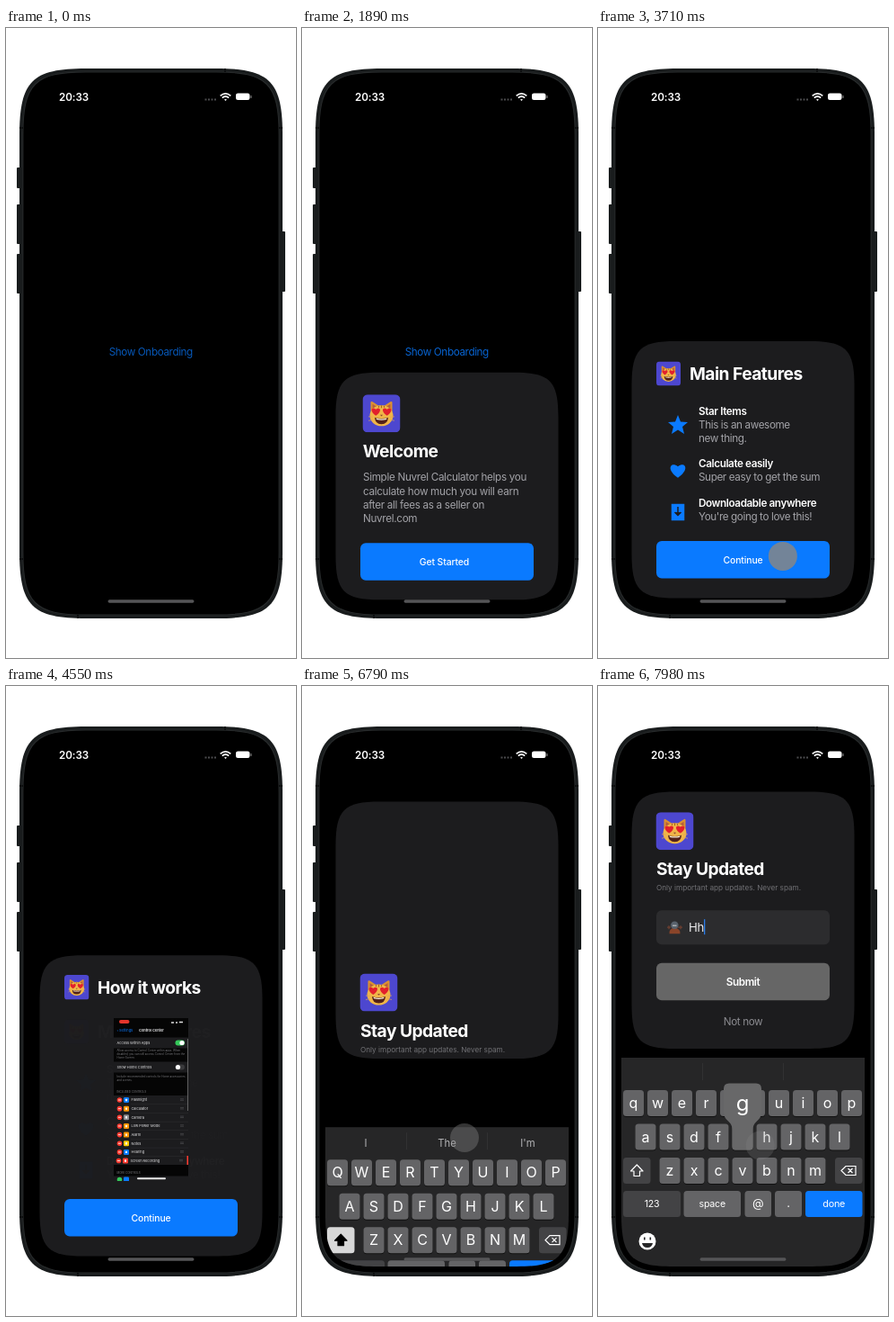
Animation of 323x700 px, one loop 8 s. Source, as an HTML page:

```html
<!DOCTYPE html>
<html lang="en">
<head>
<meta charset="utf-8">
<title>Onboarding sheet</title>
<style>
html, body { margin: 0; width: 100%; height: 100%; overflow: hidden; background: #fff; }
svg { display: block; width: 100%; height: 100%; font-family: Inter, Roboto, sans-serif; }
.mid { text-anchor: middle; }
.body { font-size: 11.7px; letter-spacing: -.033em; }
.title { font-size: 19.2px; font-weight: 700; letter-spacing: -.028em; fill: #fff; }
.label { font-size: 10.4px; font-weight: 500; letter-spacing: -.01em; fill: #fff; text-anchor: middle; }
.tiny { font-size: 3.9px; fill: #e4e4e6; }
.note { font-size: 3px; fill: #77777b; }
</style>
</head>
<body>
<svg viewBox="0 0 323 700">
  <defs>
    <clipPath id="screenClip"><path id="screenEdge"/></clipPath>
    <clipPath id="sheetClip"><path id="sheetEdge"/></clipPath>
    <clipPath id="videoClip"><rect x="120" y="369" width="83" height="181"/></clipPath>
    <path id="heart" d="M0 5C-9 -1 -5 -7 0 -3C5 -7 9 -1 0 5Z"/>
    <symbol id="icon" viewBox="0 0 42 42">
      <rect width="42" height="42" rx="5.5" fill="#4d47cf"/>
      <path d="M9 20L9 8.500Q9.500 7 11 8L18 12.500H24L31 8Q32.500 7 33 8.500L33 20Z" fill="#dc9130"/>
      <path d="M11 15.500V10.500L15.500 13.500ZM31 15.500V10.500L26.500 13.500Z" fill="#b45f3c"/>
      <ellipse cx="21" cy="23.500" rx="13" ry="11.500" fill="#f0b548"/>
      <path d="M21 12V15M18 12.800V14.500M24 12.800V14.500" stroke="#a5641f" stroke-width="1.200"/>
      <path d="M13.500 25.500Q21 28 28.500 25.500Q28 33 21 33Q14 33 13.500 25.500Z" fill="#532219"/>
      <path d="M15 26.300Q21 28 27 26.300L26.500 27.800Q21 29 15.500 27.800Z" fill="#fff3dc"/>
      <use href="#heart" transform="translate(14.800 19) scale(.88)" fill="#e2202c"/>
      <use href="#heart" transform="translate(27.200 19) scale(.88)" fill="#e2202c"/>
      <path d="M19.500 22.500H22.500L21 24.300Z" fill="#87452d"/>
      <path d="M6.500 24.500L11 25M6.500 29L11 28M35.500 24.500L31 25M35.500 29L31 28" stroke="#d8a45b" stroke-width=".7"/>
    </symbol>
  </defs>

  <g fill="#191c1d">
    <rect x="12" y="155" width="6" height="23" rx="1"/>
    <rect x="12" y="196" width="6" height="44" rx="1"/>
    <rect x="12" y="251" width="6" height="44" rx="1"/>
    <rect x="305" y="226" width="6" height="67" rx="1"/>
    <path id="body"/>
  </g>
  <path id="bezel" stroke="#272a2b" stroke-width="1.200"/>
  <path d="M15 111H19M15 590H19M304 111H308M304 590H308M244 45V49M80 652V656" stroke="#0c0e0f" stroke-width="2"/>

  <g clip-path="url(#screenClip)">
    <text x="59" y="81" font-size="11.700" font-weight="600" letter-spacing="-.1" fill="#fff">20:33</text>
    <path d="M221.500 79.500H234" stroke="#4c4c4e" stroke-width="2" stroke-dasharray="2 1.500"/>
    <g fill="none" stroke="#fff" stroke-width="1.700">
      <path d="M238.700 75.300Q244.500 70.300 250.300 75.300M240.800 77.600Q244.500 74.400 248.200 77.600"/>
      <path d="M243 79.500L244.500 81L246 79.500Q244.500 78.300 243 79.500Z" fill="#fff" stroke="none"/>
    </g>
    <rect x="256" y="72.500" width="15.500" height="7.500" rx="2.300" fill="#fff"/>
    <path d="M273 75V78" stroke="#777" stroke-width="1.200"/>
    <text id="link" class="body mid" x="161.300" y="363.500" fill="#0a7aff">Show Onboarding</text>

    <g id="sheet" clip-path="url(#sheetClip)">
      <rect x="37" y="50" width="249" height="600" fill="#1c1c1e"/>
      <g id="welcome">
        <use href="#icon" x="67.500" y="405" width="42" height="42"/>
        <text class="title" x="67.700" y="475.200">Welcome</text>
        <g id="intro" class="body" style="letter-spacing:-.027em" fill="#a3a3a8"></g>
      </g>
      <g id="features">
        <use href="#icon" x="65" y="370.500" width="27" height="27"/>
        <text class="title" x="102" y="391">Main Features</text>
        <g fill="#0a7aff">
          <path d="M89 430L92 437.500L100 438L94 443L96 451L89 446.500L82 451L84 443L78 438L86 437.500Z"/>
          <use href="#heart" transform="translate(89 492) scale(1.550)"/>
          <path d="M81 528H97V548H81ZM89 532V541M85.500 538L89 541.500L92.500 538" stroke="#1c1c1e" stroke-width="1.500"/>
        </g>
      </g>
      <g id="how">
        <use href="#icon" x="65" y="321" width="27.500" height="27.500"/>
        <text class="title" x="102" y="342">How it works</text>
        <g id="video" clip-path="url(#videoClip)"></g>
      </g>
      <g id="button">
        <rect x="65" y="570" width="193" height="41.500" rx="6" fill="#0a7aff"/>
        <text id="start" class="label" x="158.500" y="594.500">Get Started</text>
        <text id="next" class="label" x="161.500" y="594.500">Continue</text>
      </g>
      <g id="stay">
        <use href="#icon" x="64.500" y="372" width="42" height="42"/>
        <text class="title" x="65" y="442">Stay Updated</text>
        <text x="65" y="459" font-size="8.200" fill="#717175">Only important app updates. Never spam.</text>
        <rect x="65" y="481" width="193" height="38" rx="6" fill="#2c2c2e"/>
        <path d="M77 500H81M89 500H94M79 498V502M92 498V502" stroke="#6d3f30" stroke-width="1.300"/>
        <path d="M79.500 507Q79 501 85 500.500Q92 501 91.500 507Z" fill="#8a4429"/>
        <circle cx="85.300" cy="497.500" r="4.300" fill="#59626c"/>
        <path d="M83 498H87.500" stroke="#a9adb1" stroke-width="1.500"/>
        <text id="field" x="101" y="504.800" font-size="13.200" letter-spacing="-.3"></text>
        <rect id="caret" y="491" width="1.300" height="17" fill="#2b7de9"/>
        <rect x="65" y="539.500" width="193" height="41.500" rx="6" fill="#666"/>
        <text class="body mid" x="161.500" y="564.500" font-weight="600" fill="#fff">Submit</text>
        <text class="body mid" x="161.500" y="609" fill="#8b8b90">Not now</text>
      </g>
    </g>
    <g id="board"></g>
    <rect x="113.500" y="635.200" width="96" height="3.500" rx="1.750" fill="#555557"/>
  </g>
  <circle id="touch" r="16" fill="#878787"/>
</svg>

<script>
const $ = id => document.getElementById(id);
const LOOP = 8000;

function add(parent, tag, attrs, text) {
  const el = document.createElementNS('http://www.w3.org/2000/svg', tag);
  for (const k in attrs) el.setAttribute(k, attrs[k]);
  if (text) el.textContent = text;
  parent.appendChild(el);
  return el;
}
const rect = (p, x, y, width, height, fill, rx = 0) => add(p, 'rect', { x, y, width, height, fill, rx });
const label = (p, x, y, text, attrs) => add(p, 'text', { x, y, ...attrs }, text);

// Box with continuous corners that reach e along each side
function squircle(el, x, y, w, h, e) {
  const k = e * .81, m = e - k;
  el.setAttribute('d', `M${x + e} ${y}h${w - 2 * e}c${k} 0 ${e} ${m} ${e} ${e}v${h - 2 * e}` +
    `c0 ${k} ${-m} ${e} ${-e} ${e}h${2 * e - w}c${-k} 0 ${-e} ${-m} ${-e} ${-e}v${2 * e - h}` +
    `c0 ${-k} ${m} ${-e} ${e} ${-e}z`);
}
squircle($('body'), 15, 45, 293, 611, 74);
squircle($('bezel'), 18.8, 48.800, 285.4, 603.4, 70);
squircle($('screenEdge'), 26, 57, 271, 588, 58);

['Simple Nuvrel Calculator helps you', 'calculate how much you will earn',
 'after all fees as a seller on', 'Nuvrel.com']
  .forEach((s, i) => label($('intro'), 68, 501 + i * 15.3, s));

[['Star Items', 430, 'This is an awesome', 'new thing.'],
 ['Calculate easily', 488, 'Super easy to get the sum'],
 ['Downloadable anywhere', 531.5, "You're going to love this!"]]
  .forEach(([head, y, ...lines]) => {
    label($('features'), 112, y, head, { class: 'body', 'font-weight': 600, fill: '#fff' });
    lines.forEach((s, i) => label($('features'), 112, y + 15.2 * (i + 1), s, { class: 'body', fill: '#a3a3a8' }));
  });

function buildVideo(g) {
  const tiny = (x, y, s, cls = 'tiny', extra = {}) => label(g, x, y, s, { class: cls, ...extra });
  const toggle = (y, on) => {
    rect(g, 188.5, y - 3, 10.5, 6, on ? '#34c759' : '#3a3a3c', 3);
    add(g, 'circle', { cx: on ? 196 : 191.5, cy: y, r: 2.6, fill: '#fff' });
  };
  rect(g, 120, 369, 83, 181, '#050505');
  rect(g, 126, 371, 11.5, 4, '#e5352b', 2);
  add(g, 'path', { d: 'M184 374H187M189 374H191M193 373.500H197', stroke: '#ddd', 'stroke-width': 1.6 });
  tiny(123.5, 384, '‹ Settings', 'tiny', { style: 'fill:#0a7aff' });
  tiny(148, 384, 'Control Center', 'tiny', { 'font-weight': 700 });
  for (const [y, s, on] of [[396.5, 'Access Within Apps', true], [423.5, 'Show Home Controls', false]]) {
    rect(g, 120, y - 6, 83, 12, '#1c1c1e');
    tiny(123.5, y + 1.4, s);
    toggle(y, on);
  }
  ['Allow access to Control Center within apps. When', 'disabled, you can still access Control Center from the', 'Home Screen.']
    .forEach((s, i) => tiny(123.5, 406 + i * 4, s, 'note'));
  ['Include recommended controls for Home accessories', 'and scenes.']
    .forEach((s, i) => tiny(123.5, 434.5 + i * 4, s, 'note'));
  tiny(123.5, 452, 'INCLUDED CONTROLS', 'note');
  rect(g, 120, 455, 83, 77, '#1c1c1e');
  const colors = ['#0a7aff', '#ff9500', '#8e8e93', '#ff9500', '#ff9500', '#ffcc00', '#0a7aff', '#ff3b30'];
  ['Flashlight', 'Calculator', 'Camera', 'Low Power Mode', 'Alarm', 'Notes', 'Hearing', 'Screen Recording']
    .forEach((s, i) => {
      const y = 460 + i * 9.65, x = i === 7 ? -1 : 0;
      add(g, 'circle', { cx: 126.5 + x, cy: y, r: 2.8, fill: '#ff3b30' });
      add(g, 'path', { d: `M${125 + x} ${y}h3`, stroke: '#fff', 'stroke-width': .8 });
      rect(g, 131 + x, y - 3, 6, 6, colors[i], 1.2);
      rect(g, 133 + x, y - 1.2, 2, 2.4, '#fff', .5);
      tiny(139.5 + x, y + 1.4, s);
      add(g, 'path', { d: `M${194 + x} ${y - 1.2}h4m-4 1.500h4`, stroke: '#4c4c4f', 'stroke-width': .7 });
      if (i < 7) rect(g, 139, y + 4.6, 64, .4, '#333336');
    });
  rect(g, 201.5, 522, 2, 10, '#ff3b30');
  rect(g, 202, 392, .8, 80, '#777');
  tiny(123.5, 542, 'MORE CONTROLS', 'note');
  rect(g, 120, 544.5, 83, 8, '#1c1c1e');
  add(g, 'circle', { cx: 126.5, cy: 548.5, r: 2.8, fill: '#34c759' });
  rect(g, 131, 545.5, 6, 6, '#0a7aff', 1.2);
  rect(g, 146, 546.3, 32, 2, '#e8e8e8', 1);
}
buildVideo($('video'));

// Keyboard, laid out with its top edge at y = 0
const board = $('board'), keys = {}, words = [];
let shiftBox, shiftArrow, popup, popText;

function buildBoard() {
  const mid = { class: 'mid', fill: '#fff' };
  rect(board, 26, 0, 271, 240, '#262627');
  rect(board, 116, 6, .6, 19, '#39393b');
  rect(board, 206, 6, .6, 19, '#39393b');
  [['I', 71], ['The', 161.5], ["I'm", 251.5]].forEach(([s, x]) =>
    words.push(label(board, x, 21.5, s, { class: 'mid', fill: '#b4b4b6', 'font-size': 11.3 })));
  [['qwertyuiop', 39.5], ['asdfghjkl', 53], ['zxcvbnm', 80]].forEach(([row, x0], r) =>
    [...row].forEach((c, i) => {
      const x = x0 + i * 27, y = 36 + r * 37.5;
      rect(board, x - 11.5, y + 1, 23, 29, '#111', 3.5);
      rect(board, x - 11.5, y, 23, 29, '#646466', 3.5);
      keys[c] = { x, y, el: label(board, x, y + 20, c, { ...mid, 'font-size': 16 }) };
    }));
  shiftBox = rect(board, 28, 111, 30.5, 29, '#434345', 3.5);
  shiftArrow = add(board, 'path', { d: 'M43.300 119L50 126H46.500V131.500H40V126H36.500Z', 'stroke-width': 1.2, 'stroke-linejoin': 'round' });
  rect(board, 264, 111, 30.5, 29, '#434345', 3.5);
  add(board, 'path', { d: 'M271 125.500L276 120.500H287V130.500H276ZM278.500 123L283.500 128M283.500 123L278.500 128', fill: 'none', stroke: '#fff', 'stroke-width': 1.2 });
  [['123', 28, 64, '#434345', 10.6], ['space', 95.5, 63.5, '#646466', 10.6], ['@', 163.5, 29.5, '#646466', 13],
   ['.', 197, 30, '#646466', 13], ['done', 231, 63.5, '#0a7aff', 10.8]].forEach(([s, x, w, fill, size]) => {
    rect(board, x, 148, w, 29, fill, 3.5);
    label(board, x + w / 2, 166, s, { ...mid, 'font-size': size, 'letter-spacing': '-.02em' });
  });
  add(board, 'circle', { cx: 55, cy: 204, r: 9.5, fill: '#fff' });
  add(board, 'path', { d: 'M49 206H61Q60 211 55 211Q50 211 49 206ZM51 199.500h1.600v3h-1.600zM57.500 199.500h1.600v3h-1.600z', fill: '#262627' });
  popup = add(board, 'g', {});
  add(popup, 'path', { d: 'M-15 -45H15Q21 -45 21 -39V-13Q21 -7 16 -3Q11.500 1 11.500 6V25Q11.500 29 8 29H-8Q-11.500 29 -11.500 25V6Q-11.500 1 -16 -3Q-21 -7 -21 -13V-39Q-21 -45 -15 -45Z', fill: '#686869' });
  popText = label(popup, 0, -15, 'g', { ...mid, 'font-size': 24 });
}
buildBoard();

// Motion helpers
const clamp = v => Math.max(0, Math.min(1, v));
const spring = (t, from, w = 12) => {
  const k = Math.max(0, t - from) / 1000 * w;
  return 1 - (1 + k) * Math.exp(-k);
};
const easeOut = (t, from, dur) => 1 - (1 - clamp((t - from) / dur)) ** 3;
const ramp = (t, from, dur) => clamp((t - from) / dur);
function track(t, pts) {
  let i = 0;
  while (i < pts.length - 2 && t >= pts[i + 1][0]) i++;
  const a = pts[i], b = pts[i + 1], p = ramp(t, a[0], b[0] - a[0]);
  return a.slice(1).map((v, j) => v + (b[j + 1] - v) * p);
}

const OPEN = 1295, TO_FEATURES = 2600, TO_HOW = 3875, TO_STAY = 5200, FOCUS = 6635;

// Each gesture: [time, x, y, opacity]
const gestures = [
  [[520, 172, 428, 0], [640, 171, 424, .85], [840, 166, 376, .85], [960, 164, 356, .9], [1440, 164, 356, .9], [1660, 164, 356, 0]],
  [[2080, 202, 622, 0], [2200, 203, 615, .85], [2420, 207, 583, .85], [2590, 207, 583, .85], [2770, 207, 583, 0]],
  [[3440, 202, 610, 0], [3540, 203, 604, .85], [3720, 206, 586, .85], [3870, 206, 586, .85], [4060, 206, 586, 0]],
  [[4920, 204, 594, 0], [5020, 205, 591, .85], [5190, 206, 588, .85], [5390, 206, 588, 0]],
  [[6130, 192, 545, 0], [6240, 189, 535, .85], [6440, 181, 502, .85], [6660, 181, 502, .85], [6900, 181, 502, 0]],
  [[7420, 192, 518, 0], [7540, 189, 505, .8], [7650, 188, 504, .8], [7740, 187, 505, .3], [7800, 186, 507, .7], [7880, 183, 509, .6], [8010, 180, 511, .12]]
];
// Key presses: [letter, down, up]
const presses = [['h', 7630, 7700], ['h', 7770, 7840], ['g', 7910, 8100]];
const linkGlow = [[0, .72], [500, .82], [960, .82], [1010, .4], [1480, .42], [1800, .82]];

const show = (el, v) => {
  el.setAttribute('opacity', v);
  el.setAttribute('visibility', v > .004 ? 'visible' : 'hidden');
};
const shift = (el, x, y) => el.setAttribute('transform', `translate(${x} ${y})`);
let caps = null;

function setCaps(on) {
  if (caps === on) return;
  caps = on;
  for (const c in keys) keys[c].el.textContent = on ? c.toUpperCase() : c;
  shiftBox.setAttribute('fill', on ? '#d8d8d8' : '#434345');
  shiftArrow.setAttribute('fill', on ? '#000' : 'none');
  shiftArrow.setAttribute('stroke', on ? '#000' : '#fff');
  words.forEach(w => show(w, on ? 1 : 0));
}

function render(t) {
  show($('link'), track(t, linkGlow)[0]);

  const rest = 381 - 33 * spring(t, TO_FEATURES) - 49 * spring(t, TO_HOW) + 49 * spring(t, TO_STAY);
  const rise = 279 * (1 - spring(t, OPEN));
  const lift = 230.5 * easeOut(t, FOCUS, 245);
  squircle($('sheetEdge'), 37.5, rest + rise - lift, 248, 633.5 - rest, 49);
  show($('sheet'), t > OPEN ? 1 : 0);

  const contentRise = 279 * (1 - spring(t, OPEN + 24));
  shift($('welcome'), 0, contentRise);
  shift($('button'), 0, contentRise);
  shift($('stay'), 0, -231.8 * easeOut(t, 6750, 500));

  const enter = from => ramp(t, from, 300);
  const leave = from => 1 - spring(t, from, 9);
  show($('welcome'), leave(TO_FEATURES));
  show($('features'), enter(TO_FEATURES) * leave(TO_HOW));
  show($('how'), enter(TO_HOW) * leave(TO_STAY));
  show($('stay'), enter(TO_STAY));
  show($('start'), 1 - ramp(t, TO_FEATURES, 130));
  show($('next'), enter(TO_FEATURES));
  const press = [TO_FEATURES, TO_HOW, TO_STAY].reduce((m, p) =>
    Math.max(m, ramp(t, p - 160, 60) * (1 - ramp(t, p, 300))), 0);
  show($('button'), (1 - .22 * press) * leave(TO_STAY));

  const boardTop = 645 - 232 * easeOut(t, 6682, 355);
  shift(board, 0, boardTop);
  show(board, t > 6682 ? 1 : 0);
  setCaps(t < presses[0][2]);

  const typed = 'Hhg'.slice(0, presses.filter(p => t >= p[2]).length);
  const field = $('field');
  field.textContent = typed || 'Your email address';
  field.setAttribute('fill', typed ? '#ececee' : '#6c6c70');
  $('caret').setAttribute('x', 101 + (typed ? field.getComputedTextLength() : 0));
  show($('caret'), t > FOCUS && (t > 7600 || (t - FOCUS) % 1000 < 600) ? 1 : 0);

  const down = presses.find(p => t >= p[1] && t < p[2]);
  show(popup, down ? 1 : 0);
  if (down) {
    const key = keys[down[0]];
    shift(popup, key.x, key.y);
    popText.textContent = key.el.textContent;
  }

  const gesture = gestures.find(g => t >= g[0][0] && t < g[g.length - 1][0]);
  const [x, y, alpha] = gesture ? track(t, gesture) : [0, 0, 0];
  shift($('touch'), x, y);
  show($('touch'), alpha);
}

const began = performance.now();
function frame() {
  render((performance.now() - began) % LOOP);
  requestAnimationFrame(frame);
}
frame();
</script>
</body>
</html>
```
